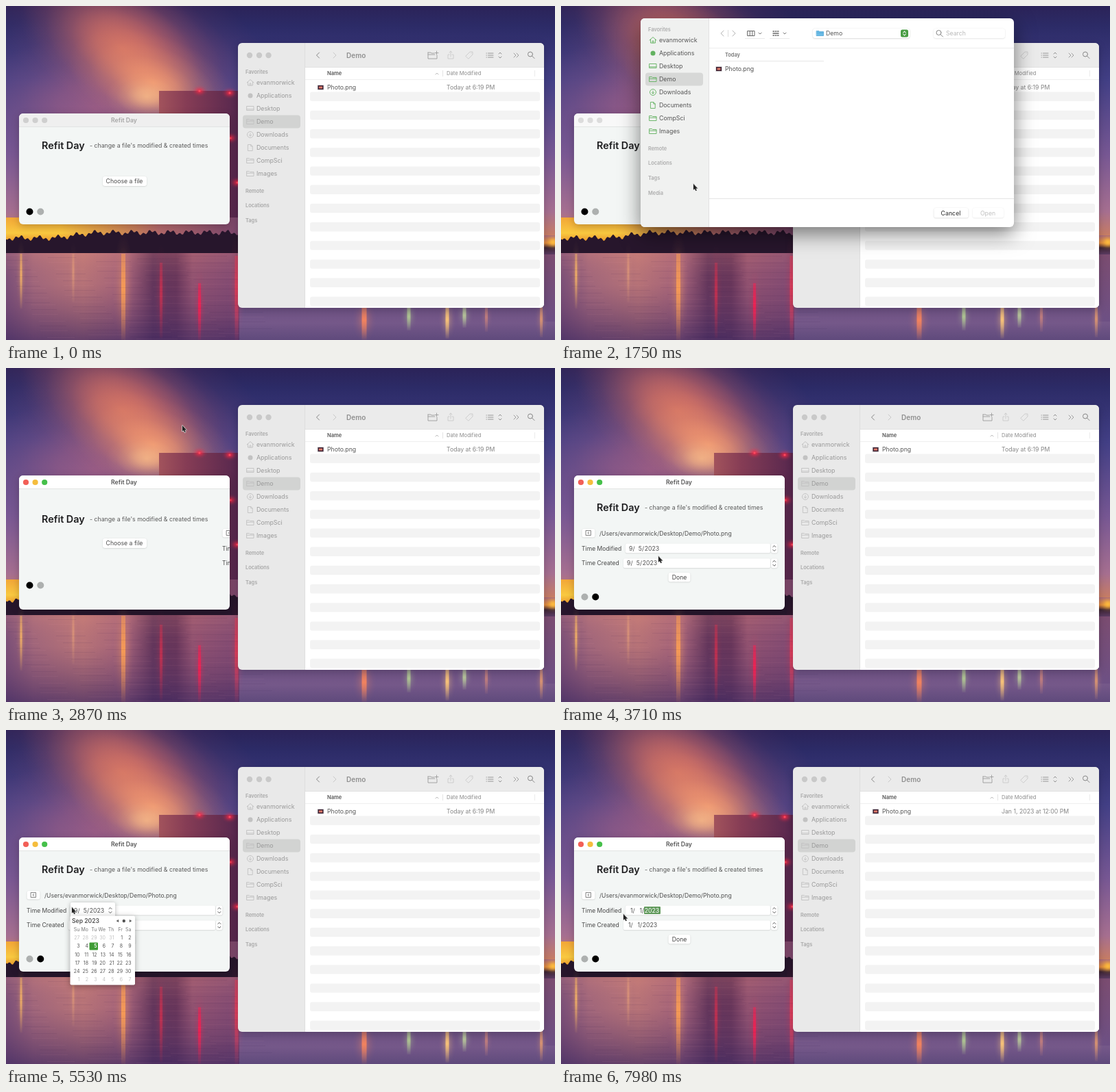
An HTML page with a canvas for the animation above (8000 ms loop, 800x488 px).

```html
<!DOCTYPE html>
<html lang="en">
<head>
<meta charset="utf-8">
<title>File date editor</title>
<style>
html, body { margin: 0; width: 100%; height: 100%; overflow: hidden; background: #33265f; }
canvas { display: block; width: 800px; height: 488px; }
</style>
</head>
<body>
<canvas id="stage" width="800" height="488"></canvas>
<script>
const W = 800, H = 488, LOOP = 8000;
const APP = 'Refit Day', USER = 'evanmorwick';
const stage = document.getElementById('stage').getContext('2d');
let g = stage;

// ---------- drawing helpers ----------
const clamp = v => Math.max(0, Math.min(1, v));
const smooth = v => { v = clamp(v); return v * v * (3 - 2 * v); };

function text(s, x, y, { size = 8.7, weight = 400, color = '#444', align = 'left' } = {}) {
  g.font = `${weight} ${size}px Inter, sans-serif`;
  g.fillStyle = color;
  g.textAlign = align;
  g.fillText(s, x, y + size * 0.36);
}

function box(x, y, w, h, r, fill, blur = 0, alpha = 0.3, drop = 0) {
  g.save();
  if (blur) {
    g.shadowColor = `rgba(0,0,0,${alpha})`;
    g.shadowBlur = blur;
    g.shadowOffsetY = drop;
  }
  g.fillStyle = fill;
  g.beginPath();
  g.roundRect(x, y, w, h, r);
  g.fill();
  g.restore();
}

function dot(x, y, r, fill) {
  g.fillStyle = fill;
  g.beginPath();
  g.arc(x, y, r, 0, 7);
  g.fill();
}

function glyph(path, x, y, color, width = 1, fill) {
  g.save();
  g.translate(x, y);
  const shape = new Path2D(path);
  if (fill) { g.fillStyle = fill; g.fill(shape); }
  g.strokeStyle = color;
  g.lineWidth = width;
  g.lineJoin = g.lineCap = 'round';
  g.stroke(shape);
  g.restore();
}

const hline = (x, y, w, color) => { g.fillStyle = color; g.fillRect(x, y, w, 1); };
const vline = (x, y, h, color) => { g.fillStyle = color; g.fillRect(x, y, 1, h); };
const button = (x, y, w, h) => box(x, y, w, h, 3, '#fff', 2, 0.18, 0.5);

function clipped(x, y, w, h, r, draw) {
  g.save();
  g.beginPath();
  g.roundRect(x, y, w, h, r);
  g.clip();
  draw();
  g.restore();
}

const ICON = {
  home: 'M-5 0L0-4.5L5 0M-3.5-1V4H3.5V-1M-1 4V1H1V4',
  desktop: 'M-5-3.5H5V2.5H-5ZM-5 .8H5',
  folder: 'M-5-3.5H-1.5L-.5-2.5H5V3.5H-5ZM-5-.8H5',
  download: 'M4.5 0A4.5 4.5 0 1 1-4.5 0A4.5 4.5 0 1 1 4.5 0M0-2V2M-1.7.5L0 2L1.7.5',
  doc: 'M-3.2-4.5H.8L3.2-2V4.5H-3.2ZM.8-4.5V-2H3.2',
  left: 'M2-4L-2 0L2 4',
  right: 'M-2-4L2 0L-2 4',
  down: 'M-2-1L0 1L2-1',
  upDown: 'M-2-2L0-4L2-2M-2 2L0 4L2 2',
  list: 'M-5-3H-4.5M-2.5-3H5M-5 0H-4.5M-2.5 0H5M-5 3H-4.5M-2.5 3H5',
  search: 'M2.5-1A3.5 3.5 0 1 1-4.5-1A3.5 3.5 0 1 1 2.5-1M1.5 1.5L5 5',
  share: 'M-2-1H-4V5H4V-1H2M0 2V-6M-2-4L0-6L2-4',
  tag: 'M-5 1L1-5H5V-1L-1 5ZM3-3H3.1',
  more: 'M-4-3L-1 0L-4 3M0-3L3 0L0 3',
  columns: 'M-5-3.5H5V3.5H-5ZM-1.7-3.5V3.5M1.7-3.5V3.5',
  grid: 'M-4-3H-2.5M-.7-3H.8M2.5-3H4M-4 0H4M-4 3H-2.5M-.7 3H.8M2.5 3H4'
};

const PLACES = [[USER, 'home'], ['Applications', ''], ['Desktop', 'desktop'], ['Demo', 'folder'],
  ['Downloads', 'download'], ['Documents', 'doc'], ['CompSci', 'folder'], ['Images', 'folder']];

function sidebar(x, y, sections, c) {
  text('Favorites', x, y, { size: 7.4, weight: 600, color: c.head });
  box(x - 4, y + 63.5, 84, 19, 4, c.pick);
  PLACES.forEach(([name, icon], i) => {
    const cy = y + 16 + i * 19;
    if (icon) glyph(ICON[icon], x + 7, cy, c.icon, 0.9);
    else dot(x + 7, cy, 3.5, c.icon);
    text(name, x + 16, cy, { color: c.item, size: 8.8 });
  });
  sections.forEach((name, i) =>
    text(name, x, y + 174 + i * 21.8, { size: 7.4, weight: 600, color: c.head }));
}

function thumbnail(x, y) {
  box(x - 5, y - 4, 10, 8, 1, '#ddd');
  box(x - 4, y - 3, 8, 6, 0, '#3b2033');
  box(x - 2.5, y - 1.5, 5, 3, 0, '#dc7868');
}

// ---------- wallpaper ----------
function gradientFill(x, y, w, h, stops, horizontal) {
  const grad = horizontal ? g.createLinearGradient(x, 0, x + w, 0) : g.createLinearGradient(0, y, 0, y + h);
  stops.forEach(([at, color]) => grad.addColorStop(at, color));
  g.fillStyle = grad;
  g.fillRect(x, y, w, h);
}

function glow(x, y, rx, ry, tilt, rgb, alpha) {
  g.save();
  g.translate(x, y);
  g.rotate(tilt);
  g.scale(rx, ry);
  const grad = g.createRadialGradient(0, 0, 0, 0, 0, 1);
  [1, 0.75, 0.35, 0.1, 0].forEach((a, i) => grad.addColorStop(i / 4, `rgba(${rgb},${a * alpha})`));
  g.fillStyle = grad;
  g.fillRect(-1, -1, 2, 2);
  g.restore();
}

function paintWallpaper() {
  const canvas = document.createElement('canvas');
  canvas.width = W;
  canvas.height = H;
  g = canvas.getContext('2d');

  // sky with a lit cloud
  gradientFill(0, 0, W, 362, [[0, '#2b2358'], [0.08, '#2c2b67'], [0.3, '#423f85'], [0.6, '#775793'], [0.83, '#a66f90'], [0.93, '#c87d62']]);
  glow(130, 150, 220, 130, 0.2, '172,98,132', 0.75);
  glow(185, 55, 230, 120, 0.45, '176,84,104', 0.85);
  glow(170, 62, 165, 100, 0.55, '222,122,98', 0.8);
  glow(215, 112, 130, 70, 0.35, '250,158,112', 0.85);
  glow(205, 132, 60, 36, 0, '255,196,140', 0.7);

  // building with warning lights
  gradientFill(223, 124, 116, 210, [[0, '#a2535c'], [0.35, '#853c55'], [1, '#56274e']], true);
  [[282, 124], [326, 127], [327, 193], [337, 258]].forEach(([x, y]) => {
    glow(x, y, 12, 9, 0, '255,40,70', 0.8);
    dot(x, y, 1.6, '#ff4a60');
  });

  // sunset, trees
  gradientFill(0, 309, 250, 38, [[0, '#f2a637'], [0.6, '#f9c940'], [1, '#e78c28']]);
  gradientFill(80, 309, 260, 38, [[0, 'rgba(190,100,80,0)'], [0.55, '#b2686a'], [1, '#7b466c']], true);
  g.fillStyle = '#27162c';
  g.beginPath();
  g.moveTo(0, 362);
  for (let x = 0; x <= 340; x += 2) {
    const rise = 8 * smooth((x - 60) / 80);
    g.lineTo(x, 339 - rise + 2.5 * Math.sin(x * 0.23) + 2 * Math.sin(x * 0.71 + 1));
  }
  g.lineTo(340, 362);
  g.fill();

  // water: warm under the cloud, dark under the building
  gradientFill(0, 361, 340, 127, [[0, '#7b5078'], [0.12, '#a66a7c'], [0.33, '#be7878'], [0.52, '#a7647a'],
    [0.63, '#613459'], [0.73, '#663458'], [0.8, '#945370'], [1, '#814a73']], true);
  gradientFill(0, 361, 340, 127, [[0, 'rgba(230,140,120,.2)'], [0.35, 'rgba(110,65,110,.1)'], [1, 'rgba(64,42,98,.7)']]);
  gradientFill(340, 438, 460, 50, [[0, '#6c5083'], [0.5, '#755889'], [1, '#5f4a7c']]);
  gradientFill(784, 361, 16, 100, [[0, '#7b4c70'], [1, '#6d5084']]);
  const streaks = [[22, 362, 80, 3, '255,187,98', 0.75], [98, 362, 70, 3, '255,180,120', 0.35],
    [171, 362, 126, 6, '255,160,82', 0.85], [226, 375, 110, 4, '225,45,75', 0.6],
    [282, 405, 83, 4, '245,30,80', 0.85], [336, 365, 123, 5, '240,60,90', 0.8],
    [522, 440, 48, 7, '255,135,90', 0.85], [587, 440, 34, 5, '190,225,150', 0.7],
    [643, 440, 46, 5, '255,200,120', 0.9], [668, 440, 30, 5, '200,225,160', 0.7],
    [700, 440, 36, 4, '240,150,120', 0.5], [780, 440, 44, 4, '255,170,105', 0.6]];
  streaks.forEach(([x, y, h, w, rgb, a]) => {
    glow(x, y + h * 0.4, w * 2.5, h * 0.65, 0, rgb, a * 0.4);
    gradientFill(x - w / 2, y, w, h, [[0, `rgba(${rgb},${a * 0.6})`], [0.4, `rgba(${rgb},${a})`], [1, `rgba(${rgb},0.05)`]]);
  });
  for (let i = 0; i < 90; i++) {
    g.fillStyle = i % 2 ? 'rgba(40,20,70,.08)' : 'rgba(255,180,170,.05)';
    g.fillRect((i * 83) % 320, 364 + (i * 37) % 124, 30 + (i * 13) % 50, 1);
  }

  // right shore
  gradientFill(784, 335, 16, 28, [[0, '#a96a7a'], [0.4, '#de873d'], [0.65, '#3f2634'], [1, '#5b3b62']]);
  glow(797, 345, 14, 12, 0, '255,190,60', 0.95);
  g = stage;
  return canvas;
}

// ---------- file browser ----------
function browserWindow(stamp) {
  box(338, 54, 446, 387, 6, '#e9e9e9', 12, 0.2, 3);
  clipped(338, 54, 446, 387, 6, () => {
    box(436, 54, 348, 36, 0, '#ebebeb');
    box(436, 90, 348, 351, 0, '#fff');
    vline(435, 54, 387, '#dedede');
    hline(436, 89, 348, '#e2e2e2');
    hline(436, 107, 348, '#efefef');
    for (let i = 0; i < 12; i++) box(443, 125.6 + i * 27.2, 335, 13.4, 3, '#f3f3f3');
  });
  [355, 369, 382.5].forEach(x => dot(x, 72, 4.2, '#c9c9c9'));
  sidebar(349, 96, ['Remote', 'Locations', 'Tags'],
    { head: '#a8a8a8', item: '#999', icon: '#c2c2c2', pick: '#d2d3d2' });

  glyph(ICON.left, 454.5, 72, '#858585', 1);
  glyph(ICON.right, 479, 72, '#c8c8c8', 1);
  text('Demo', 496, 72, { size: 10, weight: 600, color: '#8f8f8f' });
  glyph('M-7-4H-3L-2-3H2M6 0V5H-7V-4M-7-1H3M3-3.5H8M5.5-6V-1', 622, 72, '#9b9b9b', 0.9);
  glyph(ICON.share, 648, 72, '#cacaca', 0.9);
  glyph(ICON.tag, 675, 72, '#cacaca', 0.9);
  glyph(ICON.list, 705, 72, '#969696');
  glyph(ICON.upDown, 720, 72, '#909090');
  glyph(ICON.more, 744, 72, '#939393', 0.9);
  glyph(ICON.search, 765, 71.5, '#868686');

  text('Name', 468, 98.5, { size: 7.5, weight: 600, color: '#555' });
  glyph('M-2 1L0-1L2 1', 628, 99, '#aaa', 0.8);
  vline(636, 94, 9, '#e4e4e4');
  vline(770, 94, 9, '#ececec');
  text('Date Modified', 642, 98.5, { size: 7.6, color: '#8c8c8c' });
  thumbnail(458.5, 119);
  text('Photo.png', 468, 119, { color: '#555' });
  text(stamp, 642, 119, { color: '#858585' });
}

// ---------- date editor ----------
function dateField(x, y, date, selected) {
  const parts = { month: [x + 10.5, date.month], day: [x + 24, date.day] };
  for (const key in parts) {
    const [right, value] = parts[key];
    if (selected === key) box(right - 7, y - 5.5, 7.5, 11, 1, '#619a5c');
    text(value, right, y, { align: 'right', color: selected === key ? '#fff' : '#505050' });
    text('/', right, y, { color: '#505050' });
  }
  if (selected === 'year') box(x + 27, y - 5.5, 24, 11, 1, '#619a5c');
  text('2023', x + 27.7, y, { color: selected === 'year' ? '#fff' : '#505050' });
}

function editorWindow(s) {
  const h = s.tall ? 196 : 162;
  box(19, 157, 307, h, 6, '#f3f6f5', 12, 0.22, 3);
  clipped(19, 157, 307, h, 6, () => {
    box(19, 157, 307, 19.5, 0, s.active ? '#fff' : s.dialog ? '#f8f8f8' : '#efefef');
    hline(19, 176, 307, '#e2e4e3');
    const lights = s.active ? ['#f25f57', '#f5bd3d', '#45c04a'] : Array(3).fill(s.dialog ? '#dcdcdc' : '#cfcfcf');
    lights.forEach((c, i) => dot(29 + i * 13.6, 167, 4.1, c));
    text(APP, 172, 167, { weight: 600, align: 'center', color: s.active ? '#555' : '#a5a5a5' });

    text(APP, 52, 204 + s.sink, { size: 14.4, weight: 600, color: '#1d1d1f' });
    text("- change a file's modified & created times", 122, 204 + s.sink, { size: 8.75, color: '#5a5a5a' });

    g.save();
    g.translate(-285 * s.slide, 0);
    button(141, 249, 64, 14);
    text('Choose a file', 172.5, 256, { align: 'center', color: '#4c4c4c' });
    g.translate(285, 0);
    if (s.tall) datePage(s);
    g.restore();

    const dotsY = s.tall ? 334.5 - s.sink : 300.5;
    dot(34.5, dotsY, 5, s.secondPage ? '#adb0af' : '#000');
    dot(50.3, dotsY, 5, s.secondPage ? '#000' : '#adb0af');
  });
}

function datePage(s) {
  button(30.5, 235, 19, 12.5);
  glyph('M-3.5-3.5H3.5V3.5H-3.5ZM.8-1.6L-1 0L.8 1.6', 40, 241, '#666', 0.8);
  text(`/Users/${USER}/Desktop/Demo/Photo.png`, 56, 241.5, { size: 8.6, color: '#505050' });
  [['Time Modified', 94, 263.5, s.selected], ['Time Created', 91, 285.3, '']].forEach(([label, x, y, selected]) => {
    text(label, 30, y, { size: 8.6, color: '#484848' });
    box(x, y - 7, 305 - x, 14, 2, '#fff', 1.5, 0.2, 0.5);
    dateField(x, y, s.date, selected);
    button(306, y - 7, 9.5, 14);
    glyph(ICON.upDown, 310.8, y, '#555', 1);
  });
  button(156.5, 299, 32, 13.5);
  text('Done', 172.5, 305.5, { align: 'center', color: '#444' });
}

function calendar(s) {
  box(94, 252, 65, 22, 2, '#fff', 6, 0.3, 1);
  dateField(94, 263.5, s.date, s.selected);
  glyph(ICON.upDown, 152, 263.5, '#555', 1);
  box(93.5, 271.5, 94.5, 101, 2, '#fff', 8, 0.35, 2);

  const month = s.date.month - 1;
  text(`${month ? 'Sep' : 'Jan'} 2023`, 96, 279, { size: 8.6, weight: 600, color: '#555' });
  glyph('M1.5-1.7V1.7L-1.5 0Z', 162.5, 279, '#555', 0.3, '#555');
  dot(171.8, 279, 2.2, '#555');
  glyph('M-1.5-1.7V1.7L1.5 0Z', 181.5, 279, '#555', 0.3, '#555');
  ['Su', 'Mo', 'Tu', 'We', 'Th', 'Fr', 'Sa'].forEach((name, i) =>
    text(name, 107.5 + i * 12.5, 291.5, { size: 7, align: 'right', color: '#777' }));

  const lead = new Date(2023, month, 1).getDay();
  for (let i = 0; i < 42; i++) {
    const day = new Date(2023, month, 1 + i - lead);
    const inMonth = day.getMonth() === month;
    const picked = inMonth && day.getDate() === s.date.day;
    const x = 107.5 + (i % 7) * 12.5, y = 303.7 + Math.floor(i / 7) * 12.2;
    if (picked) box(x - 11, y - 5.5, 12.5, 11, 1, '#3f9c35');
    text(day.getDate(), x, y, { size: 7, align: 'right', weight: picked ? 600 : 400,
      color: picked ? '#fff' : inMonth ? '#555' : '#c2c2c2' });
  }
}

// ---------- open dialog ----------
function openDialog() {
  box(116, 18, 544, 305, 6, '#fff', 30, 0.5, 10);
  clipped(116, 18, 544, 305, 6, () => {
    box(116, 18, 99, 305, 0, '#f0f1f0');
    vline(215, 18, 305, '#e2e2e2');
    hline(216, 61, 444, '#ececec');
    hline(225, 80, 158, '#e8e8e8');
    hline(216, 281, 444, '#e5e5e5');
  });
  sidebar(127, 34, ['Remote', 'Locations', 'Tags', 'Media'],
    { head: '#adadad', item: '#555', icon: '#62b260', pick: '#d7d8d7' });

  glyph(ICON.left, 235, 40, '#b5b5b5');
  vline(243, 35, 10, '#ddd');
  glyph(ICON.right, 252, 40, '#b5b5b5');
  hline(268, 47, 29, '#e9e9e9');
  glyph(ICON.columns, 277, 40, '#666');
  glyph(ICON.down, 290, 40, '#777');
  hline(304, 47, 29, '#e9e9e9');
  glyph(ICON.grid, 313, 40, '#666', 1.4);
  glyph(ICON.down, 326, 40, '#777');

  box(367, 33, 141, 14, 3, '#fff', 2, 0.22, 0.6);
  glyph(ICON.folder, 377.5, 40, '#55a9d8', 0.8, '#6bbbe5');
  text('Demo', 386, 40, { color: '#555' });
  box(495, 34.5, 11, 11, 2.5, '#4a9d45');
  glyph('M-1.8-1L0-3L1.8-1M-1.8 1L0 3L1.8 1', 500.5, 40, '#fff', 1.1);
  box(543, 33, 104, 14, 3, '#fff', 2, 0.15, 0.6);
  glyph(ICON.search, 551.5, 40, '#777', 0.9);
  text('Search', 561, 40.3, { color: '#b8b8b8' });

  text('Today', 239, 71, { size: 7.4, weight: 600, color: '#777' });
  thumbnail(230, 92);
  text('Photo.png', 239, 92, { color: '#505050' });
  button(543.5, 295, 50, 14.5);
  text('Cancel', 568, 302.5, { align: 'center', weight: 500, color: '#444' });
  box(600, 295, 45, 14.5, 3, '#fff', 2, 0.12, 0.6);
  text('Open', 622, 302.5, { align: 'center', color: '#c0c0c0' });
}

// ---------- pointer ----------
const POINTER = [[150, 262, 500], [770, 187, 276], [1120, 176, 257], [1350, 176, 257], [1750, 193, 260],
  [2300, 257, 88], [2870, 257, 84], [3500, 146, 271], [3710, 142, 275], [4300, 130, 268],
  [4900, 98, 260], [5530, 96, 259], [7000, 96, 260], [7600, 91, 269]];

function pointer(t) {
  const next = POINTER.findIndex(([at]) => at > t);
  if (next === 0) return;
  const to = next < 0 ? POINTER.at(-1) : POINTER[next];
  const from = next < 0 ? to : POINTER[next - 1];
  const p = smooth((t - from[0]) / (to[0] - from[0] || 1));
  const x = from[1] + (to[1] - from[1]) * p, y = from[2] + (to[2] - from[2]) * p;
  glyph('M0 0V8.5L1.9 6.9L3.3 10L4.7 9.4L3.4 6.4H5.9Z', x, y, '#fff', 1.4);
  glyph('M0 0V8.5L1.9 6.9L3.3 10L4.7 9.4L3.4 6.4H5.9Z', x, y, '#222', 0.3, '#222');
}

function stateAt(t) {
  const slide = smooth((t - 2870) / 400);
  return {
    dialog: t >= 1300 && t < 2600,
    active: t >= 2600,
    tall: t >= 2730,
    sink: t >= 2730 ? 17 * (1 - slide) : 0,
    slide,
    secondPage: slide > 0.5,
    calendar: t >= 5000 && t < 7450,
    date: { month: t < 6300 ? 9 : 1, day: t < 6900 ? 5 : 1 },
    selected: t < 5700 ? '' : t < 6500 ? 'month' : t < 7100 ? 'day' : 'year',
    stamp: t < 7300 ? 'Today at 6:19 PM' : 'Jan 1, 2023 at 12:00 PM'
  };
}

const wallpaper = paintWallpaper();
const start = performance.now();

function frame() {
  const t = (performance.now() - start) % LOOP;
  const s = stateAt(t);
  g.drawImage(wallpaper, 0, 0);
  browserWindow(s.stamp);
  editorWindow(s);
  if (s.calendar) calendar(s);
  if (s.dialog) openDialog();
  pointer(t);
  requestAnimationFrame(frame);
}
frame();
</script>
</body>
</html>
```
